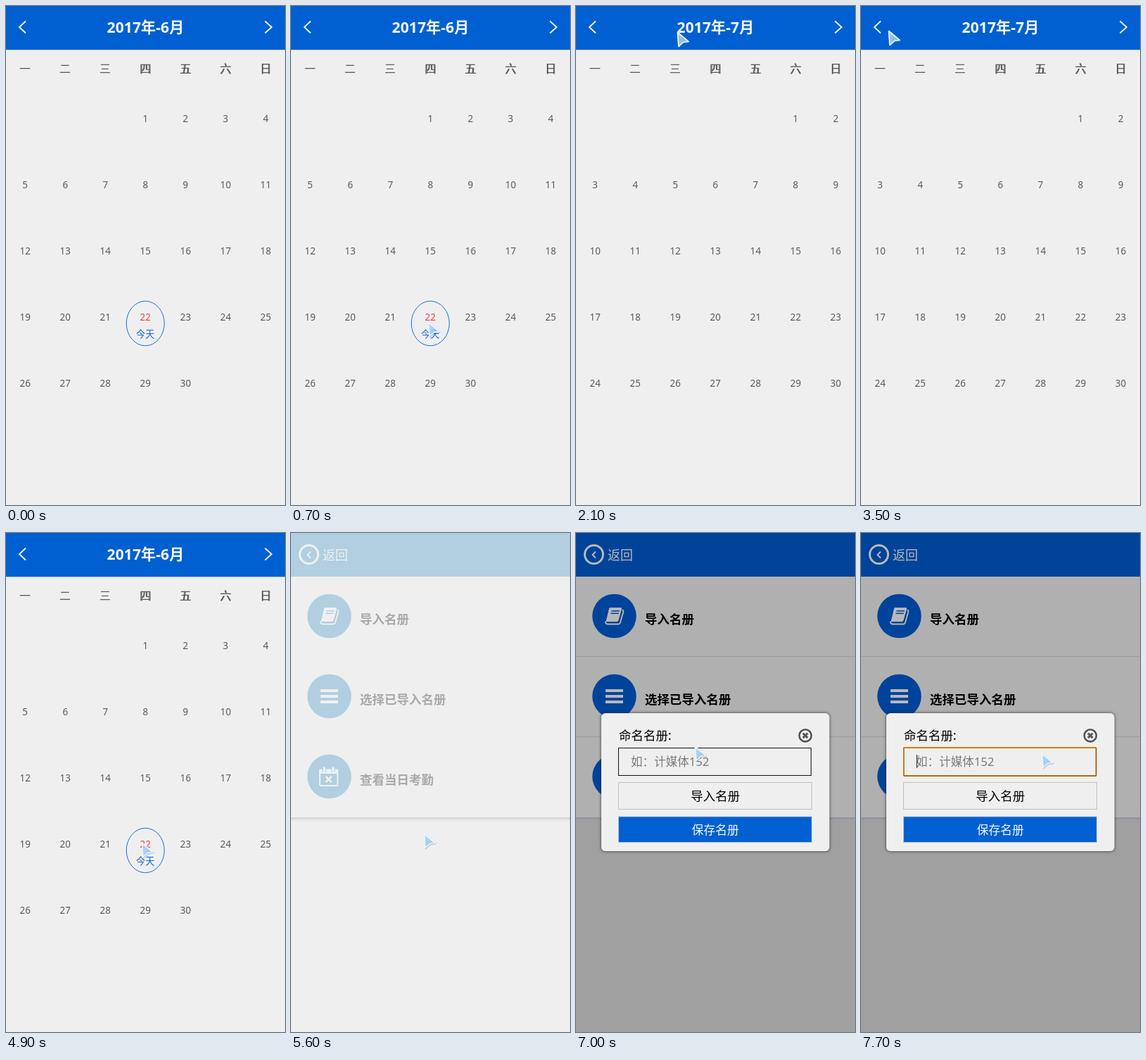
Write an HTML page that moves like this. It is 397 px wide and 709 px high and loops after 8 s.

```html
<!DOCTYPE html>
<html lang="zh-CN">
<head>
<meta charset="utf-8">
<title>Calendar</title>
<style>
  html, body { margin: 0; width: 100%; height: 100%; overflow: hidden; background: #efefef; }
  svg {
    display: block; width: 397px; height: 709px;
    --bar: #0060d1; --page: #efefef; --panel: #efefef; --icon: #f0f0f0; --ink: #000;
    font-family: "Noto Sans", "Noto Sans CJK SC", "Noto Sans CJK", sans-serif;
  }
  svg.faded { --bar: #b1cfe0; --ink: #a9a9a9; }
  svg.dialog { --bar: #00439a; --page: #a0a0a0; --panel: #b0b0b0; --icon: #b8b8b8; }
  .bar { fill: var(--bar); }
  .page { fill: var(--page); }
  .panel { fill: var(--panel); }
  .icon { fill: var(--icon); }
  .line { fill: none; stroke: var(--icon); }
  .barline { fill: none; stroke: var(--bar); }
  .label { fill: var(--ink); font-weight: 700; font-size: 17.5px; }
  .mid { text-anchor: middle; }
  .day { fill: #5c5c5c; font-size: 13.5px; }
  .week { fill: #5c5c5c; font-size: 16px; }
  .week.heavy { text-shadow: .9px 0 #5c5c5c; }
  #month, #menu, #popup, #focus, #seams, #today { display: none; }
  .june #month, .july #month, .june #today,
  .faded #menu, .menu #menu, .dialog #menu,
  .dialog #popup, .dialog #seams, .focus #focus { display: inline; }
  .faded #edge { opacity: .55; }
</style>
</head>
<body>
<svg id="stage" class="june" viewBox="0 0 397 709">
  <defs>
    <linearGradient id="edgeFade" x2="0" y2="1">
      <stop offset="0" stop-color="#55556a" stop-opacity=".38"/>
      <stop offset=".4" stop-color="#8080a0" stop-opacity=".3"/>
      <stop offset="1" stop-color="#a0a0c8" stop-opacity=".12"/>
    </linearGradient>
    <linearGradient id="glass" x2="1" y2="1">
      <stop offset="0" stop-color="#c4dff4"/>
      <stop offset="1" stop-color="#8fc6f2"/>
    </linearGradient>
    <filter id="glow" x="-30%" y="-30%" width="160%" height="160%">
      <feDropShadow dx=".5" dy=".7" stdDeviation=".7" flood-color="#3f87c4" flood-opacity=".7"/>
    </filter>
    <filter id="lift" x="-10%" y="-10%" width="120%" height="120%">
      <feDropShadow dx="0" dy="0" stdDeviation="2" flood-color="#222" flood-opacity=".9"/>
    </filter>
  </defs>

  <rect class="page" width="397" height="709"/>

  <g id="month">
    <rect class="bar" width="397" height="62"/>
    <rect y="62" width="397" height="1" fill="#b5c9e2"/>
    <path d="M28 21.5L19 30L28 38.5M368.5 21.5L378 30L368.5 38.5" fill="none" stroke="#f4f8ff" stroke-width="1.8"/>
    <text id="title" class="mid" x="198.5" y="38" fill="#f4f8ff" font-size="21.2" font-weight="700"></text>
    <g id="weeks"></g>
    <g id="days"></g>
    <g id="today">
      <ellipse cx="198.3" cy="451" rx="27" ry="31.7" fill="none" stroke="#1670d6"/>
      <text class="mid" x="198.3" y="471" font-size="13.2" fill="#0f68d3">今天</text>
    </g>
  </g>

  <g id="menu">
    <rect class="panel" width="397" height="405"/>
    <rect class="bar" width="397" height="62"/>
    <circle class="line" cx="25.5" cy="30.5" r="13" stroke-width="3"/>
    <path class="line" d="M28 26.5L23.5 31L28 35.5" stroke-width="1.9"/>
    <text class="icon" x="45" y="37.5" font-size="18">返回</text>
    <g id="rows"></g>
    <path id="seams" d="M0 175.5H397M0 289.5H397" stroke="#9b9b9b"/>
    <rect id="edge" y="404" width="397" height="5" fill="url(#edgeFade)"/>

    <g stroke-linecap="round">
      <path class="icon" d="M48 106H63.5Q65.5 106 65 108L60.5 124Q60 126 58 126H44Q42.5 126 42.9 124.5L47 107.5Z"/>
      <path class="barline" d="M51 110.7H61.3M50 114.3H60.3" stroke-width="1.5"/>
      <path class="line" d="M66.3 109.5Q67.8 110.5 67.1 113L63 127Q62.3 129.5 60 129.5H45Q42 129.5 42 126" stroke-width="1.8"/>
    </g>
    <path class="line" d="M42 224H67M42 232H67M42 240H67" stroke-width="4"/>
    <g>
      <rect class="line" x="41" y="336.5" width="25.3" height="22.5" rx="1" stroke-width="2"/>
      <rect class="icon" x="41" y="336" width="25" height="6"/>
      <path class="barline" d="M47.3 335V339.5M60 335V339.5" stroke-width="5"/>
      <path class="line" d="M47.3 333.5V338.5M60 333.5V338.5" stroke-width="3" stroke-linecap="round"/>
      <path class="line" d="M49.7 346L57.7 354M57.7 346L49.7 354" stroke-width="2.5"/>
    </g>
  </g>

  <g id="popup">
    <rect x="36" y="256" width="324.5" height="196" rx="6" fill="#efefef" filter="url(#lift)"/>
    <text x="61" y="294" font-size="17.5">命名名册:</text>
    <circle cx="326.3" cy="287.8" r="8.6" fill="none" stroke="#555" stroke-width="2.6"/>
    <path d="M323 284.5L329.6 291.1M329.6 284.5L323 291.1" stroke="#555" stroke-width="3"/>
    <rect x="60.5" y="305.5" width="274" height="39" fill="#efefef" stroke="#111"/>
    <text x="78" y="330.5" font-size="16.6" fill="#7b7b7b">如：计媒体152</text>
    <g id="focus">
      <rect x="61" y="305" width="273.5" height="40" rx="1" fill="none" stroke="#c98208" stroke-width="1.8"/>
      <path d="M61 345.2H334.7V305" fill="none" stroke="#8a560c"/>
      <path d="M79.5 315V334" stroke="#222"/>
    </g>
    <rect x="60.5" y="354.5" width="275" height="38" fill="#efefef" stroke="#c0c0c0"/>
    <text class="mid" x="198.3" y="380" font-size="17.5">导入名册</text>
    <rect x="60.5" y="403" width="275" height="36.5" fill="#0060d1" stroke="#a9bedb"/>
    <text class="mid" x="198.3" y="428.3" font-size="16.8" font-weight="500" fill="#f6f8ff">保存名册</text>
  </g>

  <g id="cursor" filter="url(#glow)">
    <path d="M.5 .5L16 13.5L8.5 14.5L2 20.5Z" fill="url(#glass)" fill-opacity=".75"
      stroke="#eef7ff" stroke-width="1.7" stroke-linejoin="round"/>
  </g>
</svg>
<script>
const LOOP = 8000;
// start time, scene classes, pointer tip
const STEPS = [
  [0, "june"],
  [700, "june", 195, 449],
  [1400, "june", 194, 447],
  [2100, "july", 144, 37],
  [3500, "july", 39, 35],
  [4200, "june", 215, 452],
  [4900, "june", 193, 440],
  [5600, "faded", 189, 427],
  [6300, "menu", 137, 130],
  [7000, "dialog", 169, 303],
  [7700, "dialog focus", 257, 313],
];
const MONTHS = {
  june: { title: "2017年-6月", first: 3, today: 22 },
  july: { title: "2017年-7月", first: 5 },
};

const $ = id => document.getElementById(id);
const columnX = i => 27.2 + 57.05 * i;

function add(parent, tag, attrs, text = "") {
  const node = document.createElementNS(parent.namespaceURI, tag);
  for (const key in attrs) node.setAttribute(key, attrs[key]);
  node.textContent = text;
  return parent.appendChild(node);
}

[..."一二三四五六日"].forEach((name, i) => {
  const style = i < 3 ? "week mid" : "week heavy mid";
  add($("weeks"), "text", { class: style, x: columnX(i) - .3, y: 94.5 }, name);
});

["导入名册", "选择已导入名册", "查看当日考勤"].forEach((name, i) => {
  const y = 118 + 114 * i;
  add($("rows"), "circle", { class: "bar", cx: 54.5, cy: y, r: 31.3 });
  add($("rows"), "text", { class: "label", x: 98, y: y + 10.7 }, name);
});

function showMonth({ title, first, today }) {
  $("title").textContent = title;
  $("days").replaceChildren();
  for (let day = 1; day <= 30; day++) {
    const cell = first + day - 1;
    const node = add($("days"), "text", {
      class: "day mid", x: columnX(cell % 7), y: 165 + 94 * Math.floor(cell / 7),
    }, day);
    if (day === today) node.style.fill = "#f0443a";
  }
}

let shown;
function render(time) {
  const step = STEPS.findLast(([start]) => start <= time);
  if (step === shown) return;
  shown = step;
  const [, scene, x, y] = step;
  $("stage").setAttribute("class", scene);
  if (MONTHS[scene]) showMonth(MONTHS[scene]);
  $("cursor").style.display = x === undefined ? "none" : "inline";
  if (x !== undefined) $("cursor").setAttribute("transform", `translate(${x} ${y})`);
}

const begin = performance.now();
function tick() {
  render((performance.now() - begin) % LOOP);
  requestAnimationFrame(tick);
}
tick();
</script>
</body>
</html>
```
